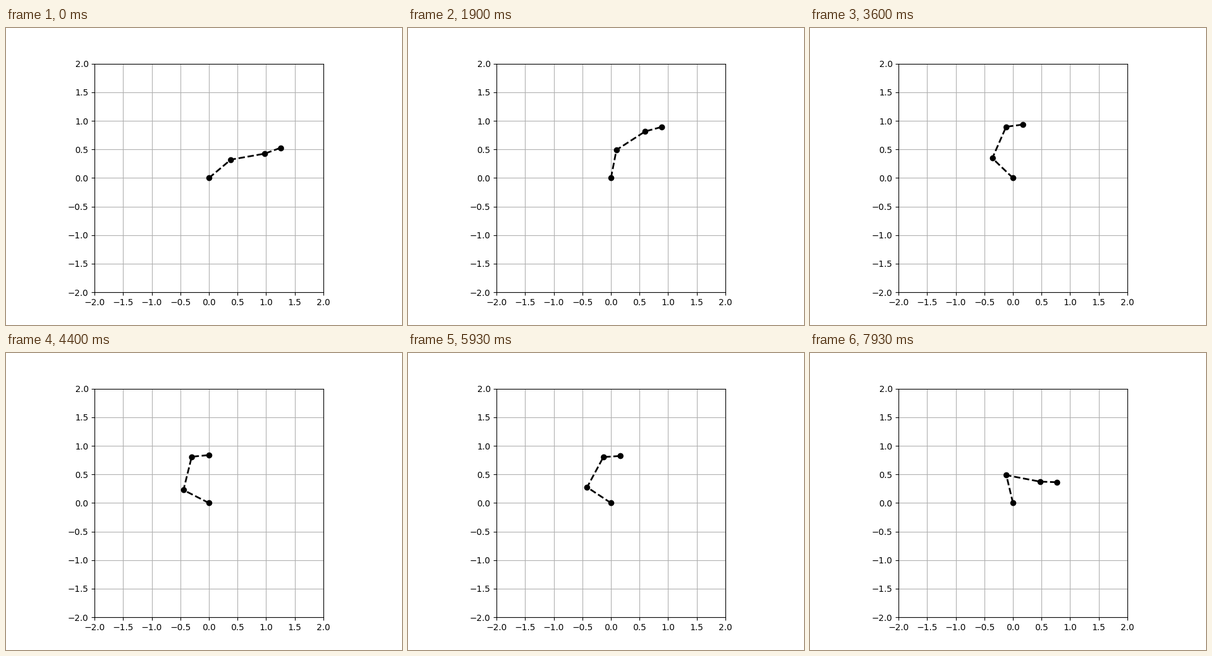
A matplotlib script that plays this animation: 640x480 px, repeating every 8 s.

```python
import matplotlib.pyplot as plt
import numpy as np
from matplotlib.animation import FuncAnimation

FRAMES = 80
INTERVAL = 100          # ms
SEGMENT = 49            # steps from one pose to the next
LINKS = np.array([0.5, 0.6, 0.3])

# Relative joint angles in degrees
POSES = np.array([
    [40.0, -30.0, 10.0],
    [156.4, -78.3, -73.1],
    [80.0, -130.0, 45.0],
])


def joint_angles(step):
    """Cubic move between poses, at rest at both ends."""
    k = min(step // SEGMENT, len(POSES) - 2)
    s = step / SEGMENT - k
    return POSES[k] + (POSES[k + 1] - POSES[k]) * s * s * (3 - 2 * s)


def arm_points(step):
    heading = np.radians(np.cumsum(joint_angles(step)))
    x = np.cumsum(LINKS * np.cos(heading))
    y = np.cumsum(LINKS * np.sin(heading))
    return np.r_[0, x], np.r_[0, y]


fig, ax = plt.subplots(figsize=(6.4, 4.8), dpi=100)
ax.set(xlim=(-2, 2), ylim=(-2, 2), aspect="equal")
ticks = np.linspace(-2, 2, 9)
ax.set_xticks(ticks)
ax.set_yticks(ticks)
ax.grid()
arm, = ax.plot([], [], "o--", color="black", lw=2)


def update(i):
    # The pose at the turn is passed over quickly
    step = i + (i >= SEGMENT)
    arm.set_data(*arm_points(step))
    return arm,


anim = FuncAnimation(fig, update, frames=FRAMES, interval=INTERVAL,
                     repeat=True, repeat_delay=0, blit=False)
plt.show()
```
